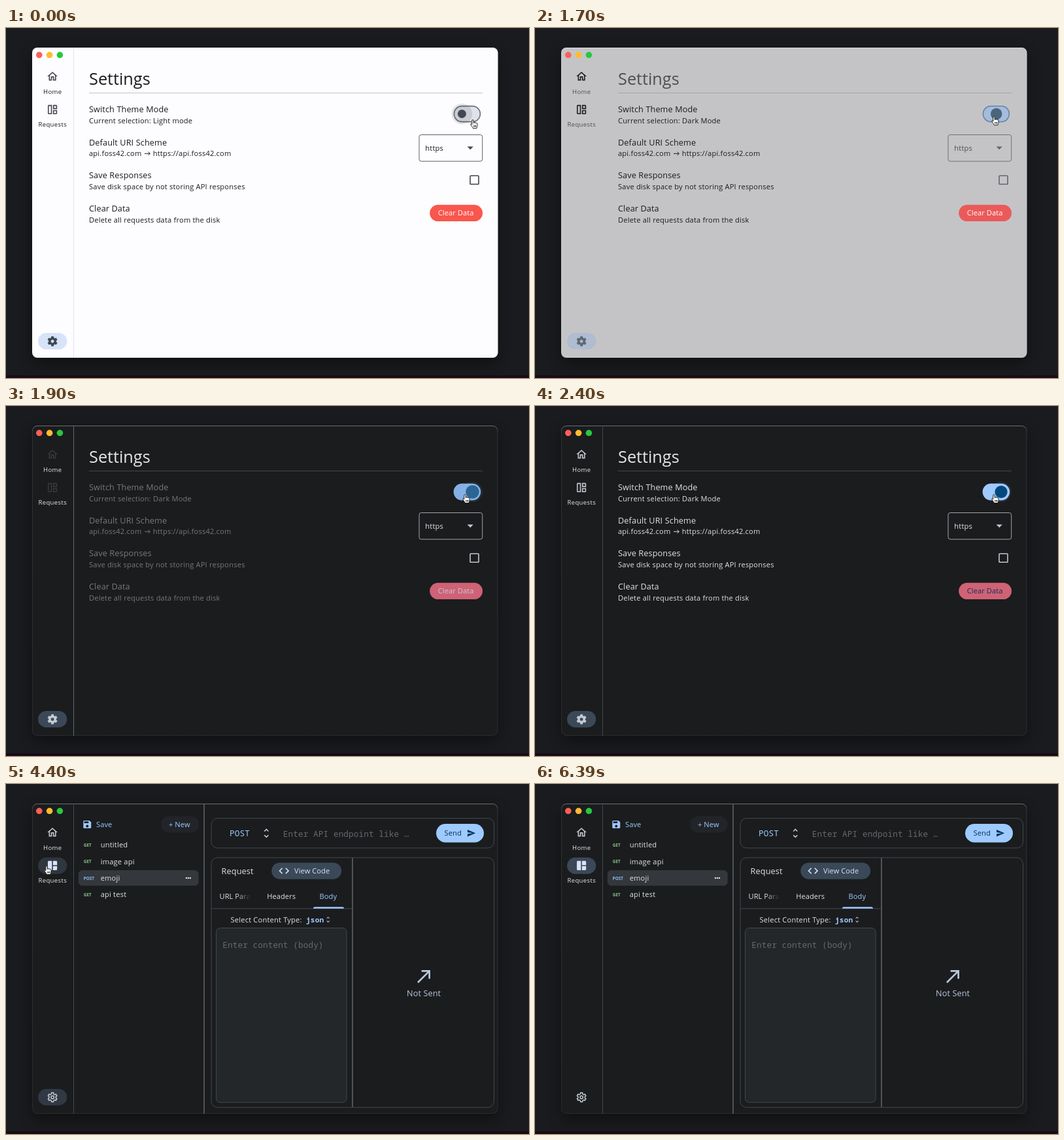
Write an HTML page that moves like this. It is 800x536 px and loops after 6570 ms.

```html
<!DOCTYPE html>
<html lang="en">
<head>
<meta charset="utf-8">
<title>Settings theme switch</title>
<style>
  html, body { margin: 0; width: 100%; height: 100%; overflow: hidden; background: #1a1b1e; }
  svg { display: block; width: 800px; height: 536px; }
  text { font-family: "Open Sans", sans-serif; white-space: pre; }
  .headline { font-size: 25.3px; fill: var(--text); }
  .title { font-size: 12.67px; letter-spacing: .12px; }
  .body { font-size: 11.08px; letter-spacing: .2px; }
  .label { font-size: 11.08px; letter-spacing: .08px; }
  .nav { font-size: 9.5px; letter-spacing: .4px; text-anchor: middle; fill: var(--text); }
  .verb { font-size: 6.33px; font-weight: 700; }
  .mono { font: 12.67px "Noto Sans Mono", monospace; letter-spacing: .12px; }
  .tile { fill: var(--tile); }
  .text { fill: var(--text); }
  .icon { fill: var(--icon); }
  .control { fill: var(--control); }
  .edge { fill: none; stroke: #43474e; }
  .blue { fill: #9ecaff; }
  .light { fill: #e2e2e5; }
  .pale { fill: #bbc7db; }
  .slate { fill: #3b4858; }
  .hint { fill: #66696c; }
</style>
</head>
<body>
<svg viewBox="0 0 800 536">
  <defs>
    <linearGradient id="rim" x1="0" y1="0" x2="0" y2="1">
      <stop offset="0" stop-color="#fff" stop-opacity=".36"/>
      <stop offset=".02" stop-color="#fff" stop-opacity=".1"/>
      <stop offset="1" stop-color="#fff" stop-opacity=".07"/>
    </linearGradient>
    <linearGradient id="fade">
      <stop offset="0" stop-color="#1a1c1e" stop-opacity="0"/>
      <stop offset="1" stop-color="#1a1c1e"/>
    </linearGradient>
    <filter id="shadow" x="-10%" y="-10%" width="120%" height="125%">
      <feGaussianBlur stdDeviation="11"/>
    </filter>
  </defs>

  <rect width="800" height="536" fill="#1a1b1e"/>
  <rect x="40" y="38" width="712" height="475" rx="8" fill="#000" opacity=".4" filter="url(#shadow)"/>
  <rect y="532" width="800" height="4" fill="#190a13"/>
  <rect x="40" y="30" width="712.5" height="475" rx="8" fill="var(--bg)"/>
  <rect x="40.5" y="30.5" width="711.5" height="474" rx="7.5" fill="none" stroke="url(#rim)"/>
  <circle cx="50.8" cy="41.3" r="4.8" fill="#fe5f57"/>
  <circle cx="66.6" cy="41.3" r="4.8" fill="#febc2e"/>
  <circle cx="82.4" cy="41.3" r="4.8" fill="#28c840"/>
  <path d="M103.5 30.5V505" stroke="var(--divider)"/>

  <!-- navigation -->
  <rect id="requestsPill" x="49" y="112.5" width="44.3" height="25.3" rx="12.65"/>
  <rect id="settingsPill" x="49" y="467" width="44.3" height="25.3" rx="12.65" fill="var(--pill)"/>
  <path class="icon" transform="translate(61.6 64.6) scale(.79)" d="M12 5.69l5 4.5V18h-2v-6H9v6H7v-7.81l5-4.5M12 3L2 12h3v8h6v-6h2v6h6v-8h3L12 3z"/>
  <path id="mosaic" class="icon" fill-rule="evenodd" transform="translate(61.6 115.5) scale(.79)"/>
  <path id="gear" stroke="var(--gear)" stroke-linejoin="round" fill-rule="evenodd" transform="translate(71.1 479.8)"/>
  <circle id="hub" cx="71.1" cy="479.8" r="2.2" fill="none" stroke="var(--gear)" stroke-width="1.5"/>
  <text class="nav" x="71.3" y="100.5">Home</text>
  <text class="nav" x="71.3" y="151.2">Requests</text>

  <g id="settings">
    <text class="headline" x="127" y="86.7">Settings</text>
    <path d="M127 99.5H729" stroke="var(--rule)"/>
    <g class="tile">
      <text class="title" x="127" y="129">Switch Theme Mode</text>
      <text class="body" x="127" y="145.8" id="mode"></text>
      <text class="title" x="127" y="179.7">Default URI Scheme</text>
      <text class="body" x="127" y="196.4">api.foss42.com</text>
      <path d="M212 192.3H220M217.6 189.7L220.4 192.3 217.6 194.9" fill="none" stroke="var(--tile)"/>
      <text class="body" x="224.7" y="196.4">https://api.foss42.com</text>
      <text class="title" x="127" y="230.4">Save Responses</text>
      <text class="body" x="127" y="247.1">Save disk space by not storing API responses</text>
      <text class="title" x="127" y="281">Clear Data</text>
      <text class="body" x="127" y="297.8">Delete all requests data from the disk</text>
    </g>
    <rect x="685.4" y="119.6" width="40" height="24" rx="12" fill="var(--track)" stroke="var(--outline)" stroke-width="1.6"/>
    <circle id="halo" cy="131.5" r="15.8" fill="var(--halo)"/>
    <circle id="thumb" cy="131.5" fill="var(--thumb)"/>
    <rect x="632" y="163.5" width="96.7" height="40.6" rx="3.2" fill="none" stroke="var(--border)"/>
    <text class="body text" x="641.3" y="187.6">https</text>
    <path class="control" d="M705.6 181.6h9.2l-4.6 4.6z"/>
    <rect x="710" y="226.3" width="13" height="13" rx=".8" fill="none" stroke="var(--control)" stroke-width="1.6"/>
    <rect x="648.2" y="270.8" width="80.8" height="25.3" rx="12.65" fill="var(--danger)"/>
    <text class="label" x="660.8" y="287.4" fill="var(--dangerText)">Clear Data</text>
  </g>

  <g id="requests">
    <path transform="translate(116.3 53.9) scale(.665)" class="blue" d="M17 3H5c-1.11 0-2 .9-2 2v14c0 1.1.89 2 2 2h14c1.1 0 2-.9 2-2V7l-4-4zm-5 16c-1.66 0-3-1.34-3-3s1.34-3 3-3 3 1.34 3 3-1.34 3-3 3zm3-10H5V5h10v4z"/>
    <text class="label blue" x="138" y="65.9">Save</text>
    <rect x="237" y="49.2" width="58" height="25.2" rx="12.6" fill="#222429"/>
    <text class="label blue" x="249" y="65.9">+ New</text>
    <rect x="110.7" y="132" width="184" height="23.8" rx="6.3" fill="#34373b"/>
    <g id="list"></g>
    <g class="light"><circle cx="275.9" cy="144" r="1.2"/><circle cx="278.9" cy="144" r="1.2"/><circle cx="281.9" cy="144" r="1.2"/></g>
    <path d="M303 30.5V505M530 113V495" stroke="#505357" stroke-width="2"/>

    <rect class="edge" x="314" y="52.5" width="432.5" height="45.5" rx="9.5"/>
    <text class="mono blue" x="342" y="80.2" font-weight="500">POST</text>
    <path class="unfold" transform="translate(388.8 66) scale(.79)" fill="#c3c6cf"/>
    <text class="mono hint" x="423.8" y="80.8">Enter API endpoint like …</text>
    <rect class="blue" x="658" y="61" width="73" height="28.5" rx="14.25"/>
    <text class="label" x="670.6" y="79.3" fill="#003258">Send</text>
    <path transform="translate(704.8 68.3) scale(.58)" fill="#003258" d="M2.01 21L23 12 2.01 3 2 10l15 2-15 2z"/>

    <rect class="edge" x="314" y="112.8" width="432.5" height="382.4" rx="9.5"/>
    <text class="title light" x="329.6" y="137.6">Request</text>
    <rect class="slate" x="406.2" y="120.4" width="107" height="25.4" rx="12.7"/>
    <path transform="translate(415.8 123.5) scale(.79)" fill="#d7e3f8" d="M9.4 16.6L4.8 12l4.6-4.6L8 6l-6 6 6 6 1.4-1.4zm5.2 0l4.6-4.6-4.6-4.6L16 6l6 6-6 6-1.4-1.4z"/>
    <text class="label" x="441" y="137" fill="#d7e3f8">View Code</text>
    <text class="label light" x="326.5" y="175.5">URL Para</text>
    <rect x="354" y="162" width="20" height="18" fill="url(#fade)"/>
    <text class="label light" x="399.2" y="175.5">Headers</text>
    <text class="label blue" x="479.6" y="175.5">Body</text>
    <path class="edge" d="M314.5 190.8H529"/>
    <path class="blue" d="M470 190.8v-.4a2.2 2.2 0 0 1 2.2-2.2h42.6a2.2 2.2 0 0 1 2.2 2.2v.4z"/>
    <text class="body light" x="343.6" y="211.5">Select Content Type:</text>
    <text class="mono blue" x="459" y="211.8" style="font-size:11.08px;font-weight:700;letter-spacing:.2px">json</text>
    <path class="unfold" transform="translate(486.7 201.7) scale(.5)" fill="#c3c6cf"/>
    <rect x="321.5" y="220.5" width="199.5" height="267.2" rx="6" fill="#242729" stroke="#43474e"/>
    <text class="mono hint" x="331.3" y="251">Enter content (body)</text>
    <path class="pale" transform="translate(623.7 278.4) scale(1.33)" d="M9 5v2h6.59L4 18.59 5.41 20 17 8.41V15h2V5H9z"/>
    <text class="title pale" x="613" y="324.8">Not Sent</text>
  </g>

  <g id="cursor" stroke-linejoin="round">
    <path id="hand" fill="#fff" stroke="#111" stroke-width=".9" d="M-3.2 1V-5.2a1.2 1.2 0 0 1 2.4 0V-1.6a1 1 0 0 1 2 .1 1 1 0 0 1 2 .5 1 1 0 0 1 1.8 .7V2.5C5 4.5 4 5 4 6.6H-1.8C-2 5-4.6 2.5-5.3 .6-5.6-.6-4.2-.8-3.2 1ZM-.3 2V4.6M1.3 2V4.6M2.9 2V4.6"/>
    <path id="arrow" fill="#000" stroke="#fff" stroke-width=".9" d="M-5-7.5V6L-1.8 3.1 .2 7.5 2.3 6.5 .4 2.3H4.8Z"/>
  </g>
</svg>
<script>
const LOOP = 6570;
const $ = id => document.getElementById(id);
const set = (el, attrs) => { for (const k in attrs) el.setAttribute(k, attrs[k]); };
const show = (el, on) => { el.style.display = on ? '' : 'none'; };
const lerp = (a, b, k) => a + (b - a) * k;
const part = (t, from, to) => Math.min(1, Math.max(0, (t - from) / (to - from)));
const smooth = k => k * k * (3 - 2 * k);

// Stops alternate time and value: t0, v0, t1, v1, ...
function track(t, stops, mix) {
  let v = stops[1];
  for (let i = 2; i < stops.length; i += 2)
    if (t > stops[i - 2]) v = mix(stops[i - 1], stops[i + 1], part(t, stops[i - 2], stops[i]));
  return v;
}
const rgb = hex => [1, 3, 5].map(i => parseInt(hex.slice(i, i + 2), 16));
const mixColor = (a, b, k) => `rgb(${rgb(a).map((v, i) => Math.round(lerp(v, rgb(b)[i], k)))})`;

const theme = (light, dark) => [1650, light, 1850, dark];
const tones = {
  bg: theme('#fdfcff', '#1a1c1e'),
  text: theme('#1a1c1e', '#e6e6e9'),
  tile: [1770, '#1a1c1e', 2050, '#e2e2e5'],
  icon: [1600, '#43474e', 1750, '#080808', 1850, '#080808', 2050, '#c3c6cf'],
  gear: theme('#3b4350', '#c8ccd4'),
  control: theme('#43474e', '#c3c6cf'),
  border: theme('#5c6067', '#a2a5ab'),
  divider: [1650, '#e3e4e9', 1800, '#85878b', 2000, '#43474e'],
  rule: theme('#c4c6cb', '#43474e'),
  pill: theme('#d7e3f8', '#3b4858'),
  danger: [1650, '#f9564d', 1800, '#cf6275'],
  dangerText: [1850, '#ffffff', 2050, '#10305a'],
  track: [1600, '#dfe2eb', 1800, '#6a96cc', 2000, '#9ecaff'],
  outline: [1600, '#6b6f77', 1800, '#6a96cc', 2000, '#9ecaff'],
  thumb: [1600, '#43474e', 1800, '#5480a8', 2000, '#00497d', 2900, '#00497d', 3000, '#003258']
};

const MOSAIC = 'M3 5v14c0 1.1.9 2 2 2h6V3H5C3.9 3 3 3.9 3 5zM19 3h-6v8h8V5C21 3.9 20.1 3 19 3zM13 21h6c1.1 0 2-.9 2-2v-6h-8z';
const HOLES = 'M9 19H5V5h4zM19 9h-4V5h4zM15 15h4v4h-4z';
const UNFOLD = 'M12 5.83L15.17 9l1.41-1.41L12 3 7.41 7.59 8.83 9zM12 18.17L8.83 15l-1.41 1.41L12 21l4.59-4.59L15.17 15z';
const HUB = 'M-2.7 0a2.7 2.7 0 1 0 5.4 0a2.7 2.7 0 1 0-5.4 0z';
document.querySelectorAll('.unfold').forEach(p => set(p, { d: UNFOLD }));

function gearPath(root, tip) {
  const pts = [];
  for (let i = 0; i < 6; i++)
    for (const [off, r] of [[-.33, root], [-.22, tip], [.22, tip], [.33, root]]) {
      const a = i * Math.PI / 3 - Math.PI / 2 + off;
      pts.push(`${(r * Math.cos(a)).toFixed(2)} ${(r * Math.sin(a)).toFixed(2)}`);
    }
  return 'M' + pts.join('L') + 'Z';
}

$('list').innerHTML = ['GET untitled', 'GET image api', 'POST emoji', 'GET api test'].map((row, i) => {
  const [verb, ...name] = row.split(' '), y = 97.4 + 25.35 * i;
  const color = verb === 'GET' ? '#8ac48d' : '#90bff5';
  return `<text class="verb" x="118.8" y="${y - 1.4}" fill="${color}">${verb}</text>
    <text class="body light" x="144.7" y="${y}">${name.join(' ')}</text>`;
}).join('');

function cursorAt(t) {
  if (t < 2900) {
    const k = smooth(part(t, 0, 400));
    return [lerp(716, 704, k), lerp(147, 142, k)];
  }
  if (t < 5800) {
    const k = smooth(part(t, 2900, 3800));
    return [lerp(704, 64, k), lerp(142, 132, k)];
  }
  const k = smooth(part(t, 5800, 6200));
  return [lerp(64, 523.5, k), lerp(132, 146, k) + 27 * Math.sin(Math.PI * k)];
}

function draw(t) {
  const root = document.documentElement.style;
  for (const name in tones)
    root.setProperty('--' + name, track(t, tones[name], mixColor));
  root.setProperty('--halo', t < 1700 ? 'rgba(26,28,30,.11)' : 'rgba(158,202,255,.08)');

  const onRequests = t >= 4400;
  show($('settings'), !onRequests);
  show($('requests'), onRequests);
  $('mode').textContent = 'Current selection: ' + (t < 1700 ? 'Light mode' : 'Dark Mode');

  const x = track(t, [1600, 697.4, 1800, 714, 2000, 713], lerp);
  set($('thumb'), { cx: x, r: track(t, [1600, 6.5, 1800, 11, 2000, 9.6], lerp) });
  set($('halo'), { cx: x });
  show($('halo'), t < 3000);

  const [cx, cy] = cursorAt(t);
  const overNav = cx < 93, overSwitch = cx > 685;
  set($('cursor'), { transform: `translate(${cx} ${cy})` });
  show($('cursor'), t < 6390);
  show($('hand'), overNav || overSwitch);
  show($('arrow'), !overNav && !overSwitch);

  const chosen = part(t, 4200, 4600);
  set($('requestsPill'), { fill: mixColor(overNav ? '#222326' : '#1a1c1e', '#3b4858', chosen) });
  show($('requestsPill'), overNav || onRequests);
  set($('settingsPill'), { opacity: 1 - part(t, 4300, 4600) });
  set($('mosaic'), { d: onRequests ? MOSAIC : MOSAIC + HOLES });
  $('mosaic').style.fill = onRequests ? '#d7e3f8' : '';
  set($('gear'), onRequests
    ? { d: gearPath(5.3, 7.1), fill: 'none', 'stroke-width': 1.5 }
    : { d: gearPath(5.6, 7.5) + HUB, fill: 'var(--gear)', 'stroke-width': .6 });
  show($('hub'), onRequests);
}

let start;
function tick(now) {
  start ??= now;
  const t = (now - start) % LOOP;
  draw(t >= 6390 ? 6390 : Math.floor(t / 100) * 100); // ten pictures a second
  requestAnimationFrame(tick);
}
draw(0);
requestAnimationFrame(tick);
</script>
</body>
</html>
```
